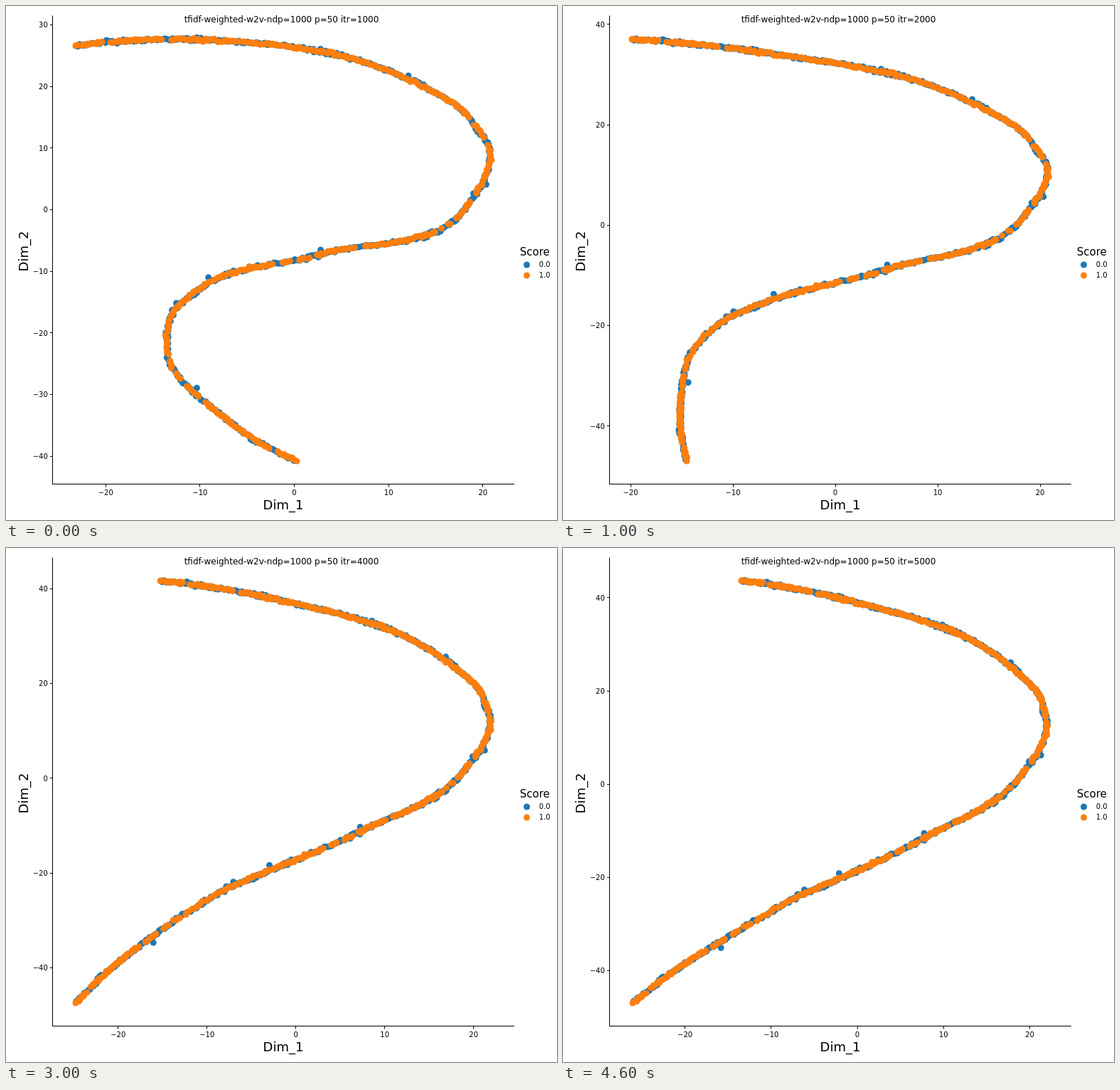
Recreate the animation shown at these times as an HTML page with a canvas. Size 775x723 px, loop 5000 ms.

```html
<!DOCTYPE html>
<html lang="en">
<head>
<meta charset="utf-8">
<title>Embedding by iteration</title>
<style>
  html, body { margin: 0; width: 100%; height: 100%; overflow: hidden; background: #fff; }
  canvas, svg { position: absolute; left: 0; top: 0; width: 775px; height: 723px; }
  text { font-family: "DejaVu Sans", sans-serif; fill: #000; }
</style>
</head>
<body>
<canvas id="plot" width="775" height="723"></canvas>
<svg id="labels" viewBox="0 0 775 723"></svg>
<script>
const BLUE = '#1f77b4', ORANGE = '#ff7f0e';
const HOLD = 1000, R = 4.5;
const ctx = document.getElementById('plot').getContext('2d');
const svg = document.getElementById('labels');

// Key points of the curve; the fourth pose lies between its neighbours
const early = [[98,56], [287,48], [556,99], [649,155], [680,203], [642,290],
  [440,350], [274,397], [232,437], [227,485], [315,585], [409,640]];
const second = [[97,47], [285,66], [566,132], [654,186], [681,229], [646,299],
  [454,371], [282,418], [223,445], [184,483], [165,572], [174,640]];
const third = [[162,47], [333,67], [592,141], [663,193], [682,233], [643,304],
  [481,385], [329,440], [270,466], [224,497], [140,578], [98,640]];
const last = [[251,46], [402,74], [622,161], [673,215], [680,250], [642,323],
  [508,408], [378,470], [323,494], [277,521], [167,588], [98,640]];
const blend = (a, b, t) => a.map((p, i) => p.map((v, k) => v + (b[i][k] - v) * t));

// x, y: pixel of zero and pixels per unit
const stages = [
  { path: early, x: [405.5, 13.265], y: [286.5, 8.665] },
  { path: second, x: [383, 14.4], y: [308.3, 7.06] },
  { path: third, x: [396, 13.36], y: [316.3, 6.82] },
  { path: blend(third, last, .62), x: [407.7, 12.5], y: [323.8, 6.67] },
  { path: last, x: [414, 12.12], y: [332.2, 6.56] }
];
const END = early.length - 1;

function random(seed) {
  return () => {
    seed = (seed * 1664525 + 1013904223) >>> 0;
    return seed / 4294967296;
  };
}

const chord = (a, b) => Math.hypot(b[0] - a[0], b[1] - a[1]);

// Dots as [position along the curve, sideways offset], about 3 px apart and wider in bunches
function scatter(seed, width, skipChance) {
  const rnd = random(seed), dots = [];
  for (let part = 0; part < END; part++) {
    const count = Math.round(chord(early[part], early[part + 1]) / 3);
    for (let i = 0; i < count; i++) {
      if (rnd() < skipChance) i += 3;
      const u = part + Math.min(i + rnd(), count) / count;
      const spread = 1.6 + 1.6 * Math.sin(u * 5) ** 4;
      dots.push([u, (rnd() + rnd() - 1) * spread * width]);
    }
  }
  return dots;
}

const strays = [[2.08, -5], [4.5, -6], [5.98, 6], [6.9, 7], [7.66, 5], [9.53, -8]];
const blueDots = [...scatter(7, 1.25, 0), ...strays];
const orangeDots = [[0, 0], ...scatter(42, 1, .04), [END, 0]];

// Cubic curve through the key points, with knots spaced by chord length
function makeCurve(p) {
  const h = [], d = [], m = [];
  for (let i = 0; i < END; i++) {
    h[i] = chord(p[i], p[i + 1]);
    d[i] = p[i].map((v, k) => (p[i + 1][k] - v) / h[i]);
  }
  for (let i = 1; i < END; i++) {
    m[i] = d[i].map((v, k) => (h[i] * d[i - 1][k] + h[i - 1] * v) / (h[i - 1] + h[i]));
  }
  m[0] = d[0].map((v, k) => 2 * v - m[1][k]);
  m[END] = d[END - 1].map((v, k) => 2 * v - m[END - 1][k]);

  return (u, off) => {
    const i = Math.min(END - 1, Math.floor(u)), t = u - i, s = 1 - t;
    const pos = [], dir = [];
    for (let k = 0; k < 2; k++) {
      const a = p[i][k], b = p[i + 1][k], ma = m[i][k] * h[i], mb = m[i + 1][k] * h[i];
      pos[k] = a * s * s * (1 + 2 * t) + ma * t * s * s + b * t * t * (3 - 2 * t) - mb * t * t * s;
      dir[k] = 6 * t * s * (b - a) + ma * s * (1 - 3 * t) + mb * t * (3 * t - 2);
    }
    const len = Math.hypot(...dir) || 1;
    return [pos[0] - dir[1] / len * off, pos[1] + dir[0] / len * off];
  };
}

function dot(x, y, color) {
  ctx.fillStyle = color;
  ctx.beginPath();
  ctx.arc(x, y, R, 0, 2 * Math.PI);
  ctx.fill();
}

function line(x1, y1, x2, y2) {
  ctx.beginPath();
  ctx.moveTo(x1, y1);
  ctx.lineTo(x2, y2);
  ctx.stroke();
}

function label(str, x, y, size, anchor = 'middle', turn = 0) {
  const el = document.createElementNS('http://www.w3.org/2000/svg', 'text');
  el.textContent = str;
  el.setAttribute('font-size', size);
  el.setAttribute('text-anchor', anchor);
  el.setAttribute('transform', `translate(${x} ${y}) rotate(${turn})`);
  svg.append(el);
}

function eachTick([zero, scale], sign, lo, hi, draw) {
  const step = scale < 8 ? 20 : 10;
  for (let v = -60; v <= 60; v += step) {
    const at = zero + sign * v * scale;
    if (at > lo && at < hi) draw(at, String(v).replace('-', '\u2212'));
  }
}

const snap = v => Math.floor(v) + .5;

function drawAxes({ x, y }) {
  ctx.strokeStyle = '#000';
  ctx.lineWidth = 1;
  line(65.5, 13.5, 65.5, 673);
  line(65, 672.5, 715, 672.5);
  eachTick(x, 1, 66, 715, (at, str) => {
    line(snap(at), 673, snap(at), 676.5);
    label(str, at, 687.6, 10);
  });
  eachTick(y, -1, 14, 673, (at, str) => {
    line(62, snap(at), 65.5, snap(at));
    label(str, 58.8, at + 3.8, 10, 'end');
  });
  label('Dim_1', 390, 708.3, 18);
  label('Dim_2', 31.3, 345, 18, 'middle', -90);
}

function drawLegend() {
  label('Score', 722.8, 351, 15, 'start');
  [['0.0', BLUE], ['1.0', ORANGE]].forEach(([str, color], i) => {
    dot(732.5, 364 + 15 * i, color);
    label(str, 749.8, 367.2 + 14.8 * i, 10, 'start');
  });
}

function draw(n) {
  const at = makeCurve(stages[n].path);
  ctx.fillStyle = '#fff';
  ctx.fillRect(0, 0, 775, 723);
  svg.replaceChildren();
  for (const [u, off] of blueDots) dot(...at(u, off), BLUE);
  for (const [u, off] of orangeDots) dot(...at(u, off), ORANGE);
  drawAxes(stages[n]);
  drawLegend();
  label(`tfidf-weighted-w2v-ndp=1000 p=50 itr=${(n + 1) * 1000}`, 387.5, 23.2, 12);
}

let shown = -1;
const start = performance.now();

function tick() {
  const n = Math.floor((performance.now() - start) / HOLD) % stages.length;
  if (n !== shown) draw(shown = n);
  requestAnimationFrame(tick);
}
tick();
</script>
</body>
</html>
```
